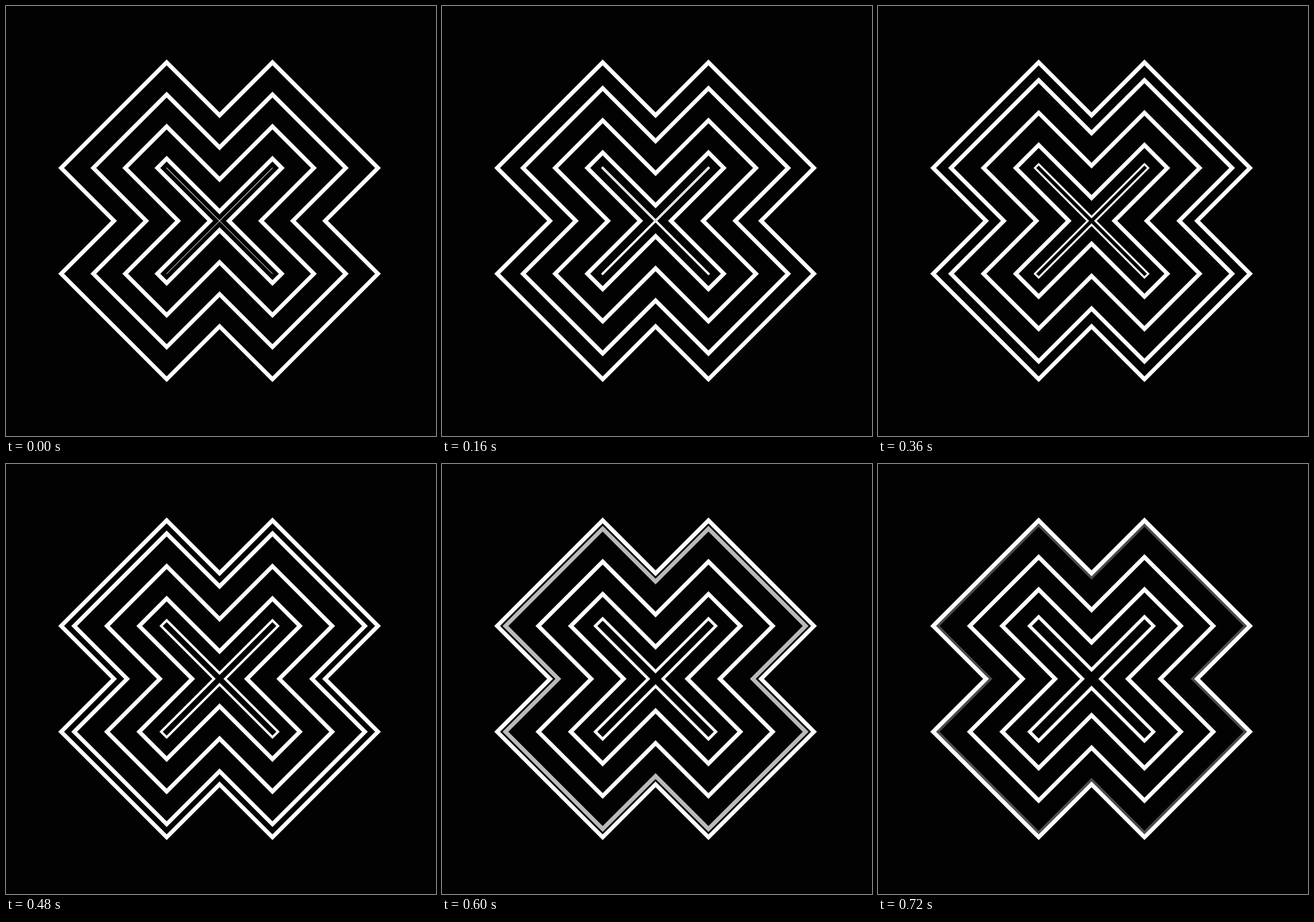
Animation, 748 px wide and 748 px high, one loop 0.76 s. Source, as an HTML page:

```html
<!DOCTYPE html>
<html lang="en">
<head>
<meta charset="utf-8">
<title>Expanding cross outlines</title>
<style>
  html, body { margin: 0; width: 100%; height: 100%; overflow: hidden; background: #020202; }
  svg { display: block; width: 100vw; height: 100vh; }
  path { fill: #fefefe; fill-rule: evenodd; }
</style>
</head>
<body>
<svg viewBox="0 0 748 748">
  <path id="core"/>
  <path id="inner"/>
  <path id="middle"/>
  <path id="fading"/>
  <path id="frame"/>
</svg>
<script>
const CX = 371.5, CY = 373.7, ARM = 92;
const STEP = 40, STEPS = 19, BAND = 10.1;
const el = id => document.getElementById(id);

// Diagonal cross whose edges are pushed out by d, measured along the axes.
function cross(d) {
  const far = ARM + d;
  const points = [];
  let x = [0, ARM, far], y = [-d, -far, -ARM];
  for (let side = 0; side < 4; side++) {
    x.forEach((px, i) => points.push([CX + px, CY + y[i]]));
    [x, y] = [y.map(v => -v), x];
  }
  return 'M' + points.map(p => p.map(v => v.toFixed(2)).join(' ')).join('L') + 'Z';
}

function band(id, outer, inner) {
  el(id).setAttribute('d', cross(outer) + cross(inner));
}

function ring(id, mid) {
  band(id, mid + BAND / 2, mid - BAND / 2);
}

function draw(n) {
  band('core', Math.max(0.6 + 0.57 * n, 1.22 * n - 2), Math.max(0, 0.83 * n - 3.2));
  ring('inner', 16.2 + 2.62 * n);
  ring('middle', 72.1 + 2.65 * n);
  ring('fading', 127.6 + 2.77 * n);
  el('fading').style.opacity = Math.min(1, 0.73 - 0.147 * (n - 15));
}

let shown = -1;
function tick(now) {
  const n = Math.floor(now / STEP) % STEPS;
  if (n !== shown) draw(shown = n);
  requestAnimationFrame(time => tick(time - start));
}

band('frame', 188.6, 178.5);
const start = performance.now();
tick(0);
</script>
</body>
</html>
```
